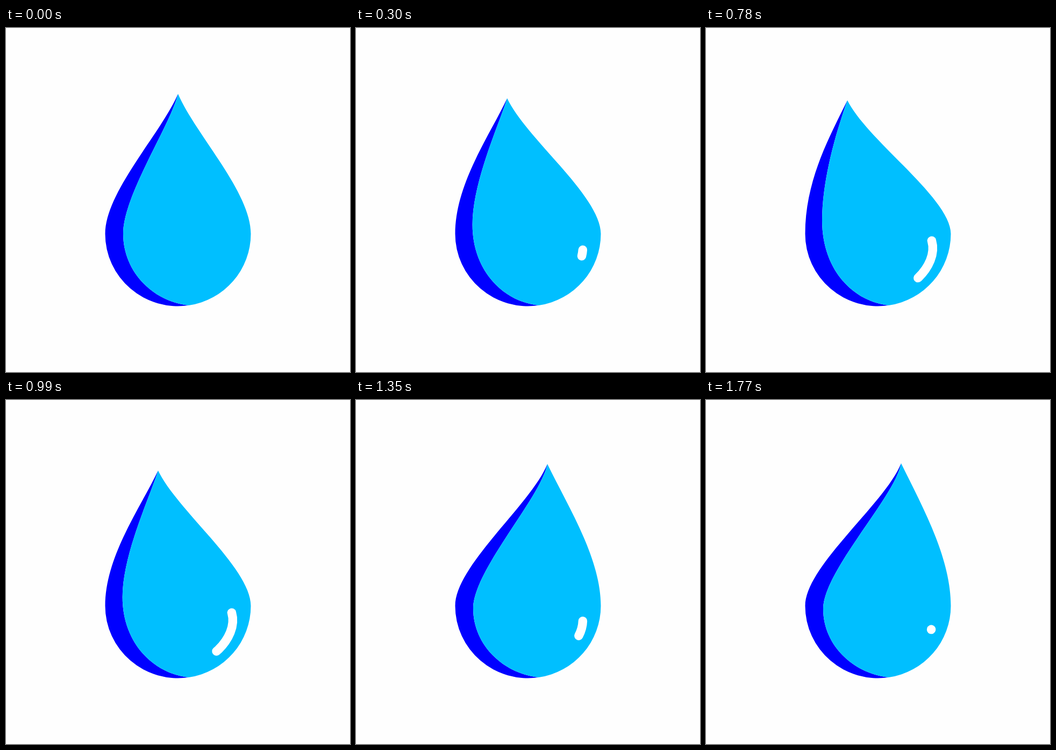
Animation of 640 by 640 pixels, one loop 1.8 s. Source, as an HTML page:

```html
<!DOCTYPE html>
<html lang="en">
<head>
<meta charset="utf-8">
<title>Water drop</title>
<style>
  html, body { margin: 0; width: 100%; height: 100%; overflow: hidden; background: #fefefe; }
  svg { display: block; width: 100%; height: 100%; }
</style>
</head>
<body>
<svg viewBox="0 0 640 640">
  <path id="shade" fill="#00f"/>
  <path id="body" fill="#00bfff"/>
  <path id="shine" fill="none" stroke="#fff" stroke-width="16.5" stroke-linecap="round"
    d="M419.6 394.5L420 396C427 420 414 446 395 464.5L391.5 467.5"/>
</svg>
<script>
  const [shade, body, shine] = ['shade', 'body', 'shine'].map(id => document.getElementById(id));
  const LOOP = 1800, STEP = 30;

  const TIP = { center: [320, 122.5], left: [263, 134.5], right: [363, 117.8] };

  // right handle x y, lower handle y | left, likewise | inner, likewise | inner bulge x y, handle y
  const CENTER = [352, 197, 305, 288, 197, 305, 305, 183, 311, 218, 383, 453];
  const LEFT   = [299, 208, 317, 230, 202, 283, 247, 180, 275, 216, 358, 449];
  const RIGHT  = [399, 192, 291, 334, 192, 309, 351, 182, 318, 218, 389, 455];

  const lerp = (a, b, k) => a + (b - a) * k;
  const mix = (a, b, k) => a.map((v, i) => lerp(v, b[i], k));
  const progress = (t, from, to) => Math.min(1, Math.max(0, (t - from) / (to - from)));
  const smooth = x => x * x * (3 - 2 * x);
  const easeOut = x => 1 - (1 - x) ** 2.5;

  // Bezier easing with flat ends: handles (x1, 0) and (x2, 1)
  function swing(x, x1 = 0.25, x2 = 0.35) {
    let lo = 0, hi = 1;
    for (let i = 0; i < 30; i++) {
      const s = (lo + hi) / 2;
      const at = 3 * (1 - s) ** 2 * s * x1 + 3 * (1 - s) * s * s * x2 + s ** 3;
      if (at < x) lo = s; else hi = s;
    }
    return smooth(lo);
  }

  function tipAt(n) {
    const turn = 28.6;
    return n < turn
      ? mix(TIP.center, TIP.left, easeOut(progress(n, 0, 27.3)))
      : mix(TIP.left, TIP.right, swing(progress(n, turn, 51.2)));
  }

  // The flanks bend with the sideways lean of the tip
  function flanks(x) {
    const middle = TIP.center[0];
    return x < middle
      ? mix(CENTER, LEFT, progress(x, middle, TIP.left[0]))
      : mix(CENTER, RIGHT, progress(x, middle, TIP.right[0]));
  }

  function drawDrop(n) {
    const [tx, ty] = tipAt(n);
    const [rx, ry, rb, lx, ly, lb, ix, iy, ib, ex, ey, eb] = flanks(tx);
    const inner = `C273 509 ${ex} ${eb} ${ex} ${ey}C${ex} ${ib} ${ix} ${iy} ${tx} ${ty}Z`;
    const start = `M${tx} ${ty}`;
    shade.setAttribute('d',
      `${start}C${lx} ${ly} 184.5 ${lb} 184.5 383A135.5 134.5 0 0 0 340 516${inner}`);
    body.setAttribute('d',
      `${start}C${rx} ${ry} 455.5 ${rb} 455.5 383A135.5 134.5 0 0 1 340 516${inner}`);
  }

  function drawShine(n) {
    const ease = (from, to) => smooth(progress(n, from, to));
    const opening = n < 30;
    const top = opening ? lerp(25, 0, ease(0, 30)) : lerp(0, 33, ease(29.5, 60));
    const end = opening ? lerp(25, 83, ease(5.5, 30)) : lerp(83, 33.1, ease(32.6, 51));
    shine.style.visibility = n === 0 ? 'hidden' : 'visible';
    shine.setAttribute('stroke-dasharray', `${Math.max(0.01, end - top)} 999`);
    shine.setAttribute('stroke-dashoffset', -top);
  }

  function render(ms) {
    const n = Math.floor((ms % LOOP) / STEP);
    drawDrop(n);
    drawShine(n);
  }

  const began = performance.now();
  function tick(now) {
    render(Math.max(0, now - began));
    requestAnimationFrame(tick);
  }
  render(0);
  requestAnimationFrame(tick);
</script>
</body>
</html>
```
